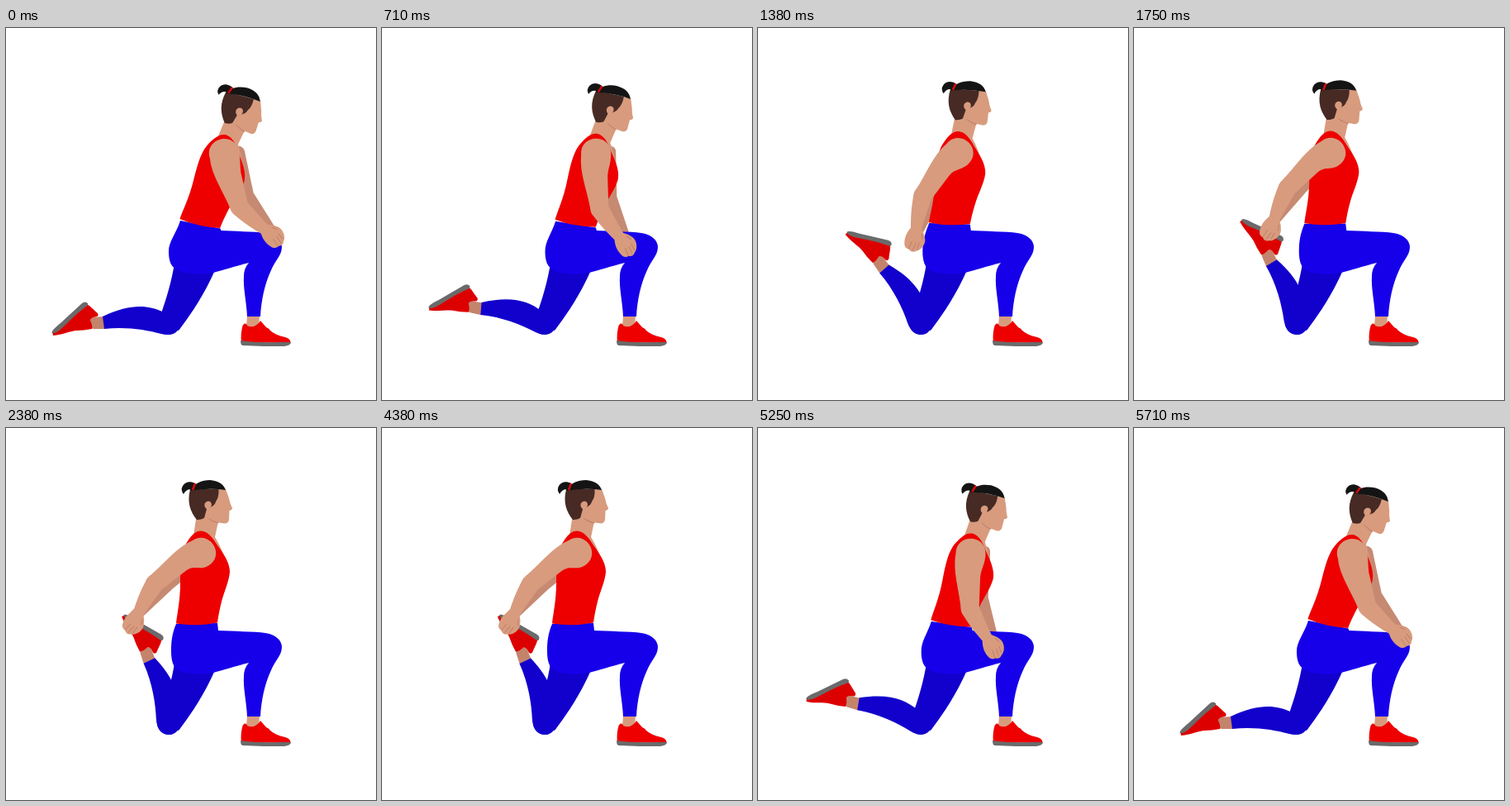
Write an HTML page that moves like this. It is 448 px wide and 450 px high and loops after 5.75 s.

```html
<!DOCTYPE html>
<html lang="en">
<head>
<meta charset="utf-8">
<title>Kneeling quad stretch</title>
<style>
  html, body { margin: 0; width: 100%; height: 100%; overflow: hidden; background: #fff; }
  svg { display: block; width: 448px; height: 450px; }
  .skin { fill: #d89b7e; }
  .shade { fill: #c4846c; }
  .red { fill: #ee0000; }
  .deep-red { fill: #dd0000; }
  .blue { fill: #1600ea; }
  .navy { fill: #1200cc; }
  .sole { fill: #6b6a6b; }
  .hair { fill: #472a24; }
  .black { fill: #141414; }
  .line { fill: none; stroke: #bd8069; stroke-width: 1; stroke-linecap: round; }
  #farArm { fill: none; stroke: #c68a73; stroke-width: 14; stroke-linecap: round; stroke-linejoin: round; }
</style>
</head>
<body>
<svg viewBox="0 0 448 450">
  <path id="farArm"/>

  <!-- rear leg -->
  <path class="navy" d="M204 284C201 305 194 328 188 345L187 358L209 366C221 350 238 327 253 293Z"/>
  <circle class="navy" cx="197" cy="357" r="14"/>
  <g id="shin">
    <path class="shade" d="M119 349L103 350L99 362L106 364L120 364Z"/>
    <path class="deep-red" d="M97 334C101 335 106 341 111 345Q113 349 108 349.500Q102 350 102 354Q105 360 104 364Q94 366 85 366C76 367 69 371 57 372L56 367Z"/>
    <path class="sole" d="M55.500 369C56 365 60 362 66 357L92 333Q96 330 99 333Q100 335 97 337C86 345 78 353 70 361C64 367 59 370 55.500 369Z"/>
    <path class="navy" d="M189 343C172 335 150 333 117 349L119 364C145 361 170 365 188 370C203 374 212 364 211 356L198 344Z"/>
  </g>

  <!-- front leg -->
  <path class="skin" d="M292 347H307L306 362L298 365L291 362Z"/>
  <path class="red" d="M286 362C287 357 291 356 292 360C297 363 304 361 308 354L315 362Q318 363 320 366C326 371 333 373 338 374Q345 376 344.500 381L285 380C284 373 285 367 286 362Z"/>
  <path class="sole" d="M284 378C300 381 320 380 345 380Q345 384 337 385C320 385 303 385 287 384Q284 384 284 378Z"/>
  <path class="blue" id="pelvis"/>

  <!-- trunk and head -->
  <g id="trunk">
    <path class="skin" d="M231 104L227 130L246 140L266 160Q260 143 253 132L257 113Z"/>
    <path class="red" d="M218 140C224 130 229 124.500 236 124.500C244 125 250 132 256 142C264 153 271 163 271 174C270 186 264 198 261 210C258 222 257 229 256 235.500Q230 240.500 206 236.500C207 225 211 210 211 187C211 165 212 150 218 140Z"/>
    <g id="head">
      <path class="skin" d="M240 74H266L270 85Q271 91 274 97Q274 99 270.500 100L270 110Q270 115 265 115.500Q250 114 238 107Z"/>
      <path class="line" d="M243 108Q249 113 257 115"/>
      <path class="hair" d="M223 74H257.500Q258 84 254 89Q253 93 249 95L246 98Q242 102 241 108Q238 111 231 111C223 101 219 90 223 74Z"/>
      <path class="skin" d="M248 96C251 90 246 87 243 89C239 91 240 96 243 98L240 109L250 110Z"/>
      <path class="black" d="M223 76C227 67 237 63 247 63C257 64 263 67 266 75Q245 72 223 76Z"/>
      <path class="black" d="M215 80Q211 75 214 70C217 65 223 64 229 67L227 75Q219 72 215 80Z"/>
      <path d="M229 67L226 75" fill="none" stroke="#d80b0b" stroke-width="2.500"/>
    </g>
  </g>

  <!-- near arm -->
  <g class="skin" id="upper">
    <path id="biceps"/>
    <circle cy="67" r="11"/>
  </g>
  <g class="skin" id="lower">
    <path d="M-11 0C-11 16 -9 30 -6 44H6.500C7 30 10 14 11 0Z"/>
    <path d="M-6 40C-11 48 -12 55 -10 63Q-8 67 -4 67Q0 71 4 68C11 66 15 57 13 51Q11 45 6.500 40Z"/>
    <path class="line" d="M-4 66L-2 57M1 67L3 58M6 65L7 57M10 52L8 46"/>
  </g>
</svg>
<script>
const $ = id => document.getElementById(id);
const LOOP = 5750, RAISE = 330, HELD = 2380, LOWER = 4380, REST = 5710;
const mix = (a, b, p) => a + (b - a) * p;
const rad = Math.PI / 180;

// Cubic bezier easing with control points (x1,0) and (x2,1).
function ease(x, x1, x2) {
  let lo = 0, hi = 1;
  for (let i = 0; i < 24; i++) {
    const u = (lo + hi) / 2, v = 1 - u;
    if (3 * v * v * u * x1 + 3 * v * u * u * x2 + u * u * u < x) lo = u; else hi = u;
  }
  return lo * lo * (3 - 2 * lo);
}

// Fraction of a move drawn in n discrete steps.
function stepped(t, start, end, n) {
  const k = Math.floor((t - start) / (end - start) * (n - 1) + 0.3);
  return Math.min(1, (k + 1) / n);
}

// 0 = hands on the knee, 1 = foot held behind.
function progress(t) {
  if (t < RAISE || t >= REST) return 0;
  if (t < HELD) return ease(stepped(t, RAISE, HELD, 50), .32, .29);
  if (t < LOWER) return 1;
  return 1 - ease(stepped(t, LOWER, REST, 33), .44, .57);
}

// End of a limb of length len, angle measured from straight down.
const reach = ([x, y], angle, len) =>
  [x + len * Math.sin(angle * rad), y + len * Math.cos(angle * rad)];

function place(id, [x, y], angle) {
  $(id).setAttribute('transform', `translate(${x} ${y}) rotate(${-angle})`);
}

function pose(p) {
  $('shin').setAttribute('transform', `rotate(${72.3 * p} 197 357)`);
  $('trunk').setAttribute('transform', `rotate(${13.8 * (1 - p)} 231 252)`);
  $('head').setAttribute('transform', `rotate(${1 - p} 243 118)`);

  const hip = mix(197, 200, p);
  const lx = mix(211, 206, p), ly = mix(233, 237, p);
  const rx = mix(259.5, 256, p), ry = mix(242.5, 236, p);
  $('pelvis').setAttribute('d',
    `M${lx} ${ly}L${rx} ${ry}L${rx + 1} 245C275 246 300 246 314 248` +
    'C328 250 334 258 334 265C334 275 326 281 321 293C313 310 309 330 308 349H292' +
    'C291 330 287 315 288 300Q288 291 294 284C278 288 262 293 251 296' +
    `C235 299 222 298 210 294C${hip + 2} 290 ${hip} 281 ${hip} 270` +
    `C${hip} 258 ${lx - 5} 249 ${lx} ${ly}Z`);

  const farShoulder = [mix(282, 248, p), mix(150, 148, p)];
  const farElbow = reach(farShoulder, mix(12, -51, p), mix(53, 65, p));
  const farWrist = reach(farElbow, mix(32, -47, p), 56);
  $('farArm').setAttribute('d', `M${farShoulder}L${farElbow}L${farWrist}`);

  // The inner side of the upper arm flattens as it swings back.
  const inner = mix(13, 8, p), dip = mix(33, 26, p);
  $('biceps').setAttribute('d',
    `M-18 0C-18 -24 18 -24 18 0C18 13 ${inner} ${dip - 12} ${inner} ${dip}` +
    'L11 67H-11C-13 45 -22 22 -18 0Z');

  const shoulder = [mix(264, 236, p), mix(152, 151, p)];
  const bend = mix(16, -56.5, p);
  place('upper', shoulder, bend);
  place('lower', reach(shoulder, bend, 67), mix(48.4, -29, p));
}

const begin = performance.now();
function frame() {
  pose(progress((performance.now() - begin) % LOOP));
  requestAnimationFrame(frame);
}
frame();
</script>
</body>
</html>
```
